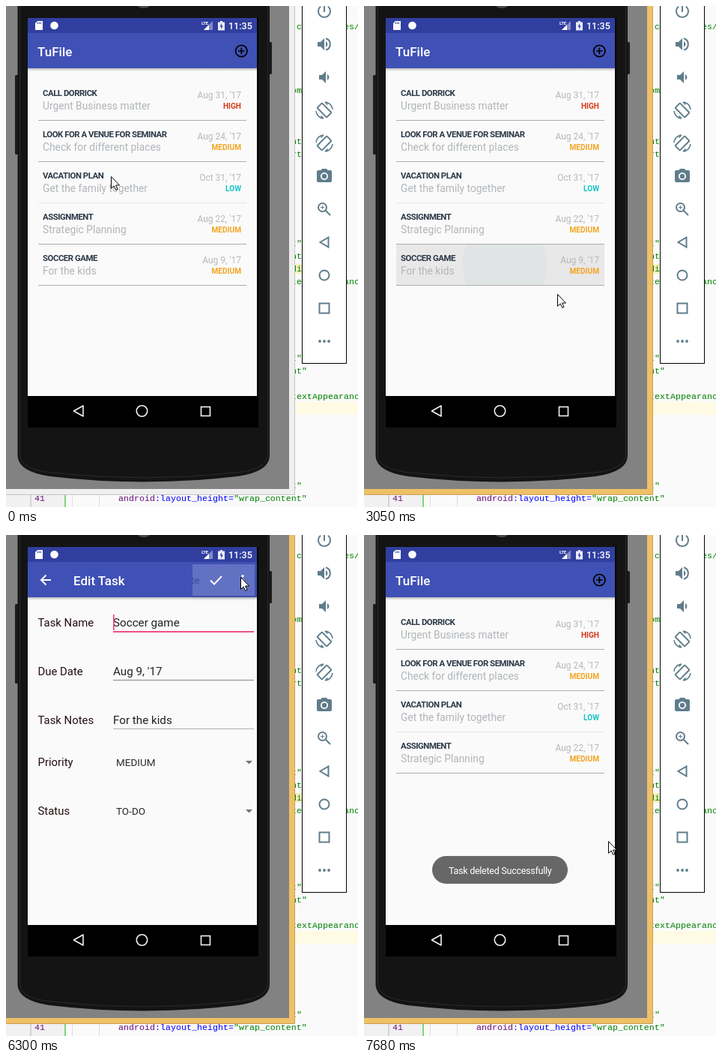
Recreate the animation shown at these times as an HTML page. Size 470x668 px, loop 8000 ms.

```html
<!DOCTYPE html>
<html lang="en">
<head>
<meta charset="utf-8">
<title>Task list demo</title>
<style>
  html, body { margin: 0; width: 100%; height: 100%; overflow: hidden; background: #fafafa; }
  svg { display: block; width: 470px; height: 668px; font-family: Roboto, sans-serif; }
  text { white-space: pre; }
  .code { font: 11.67px "Liberation Mono", monospace; fill: #008000; }
  .attr { fill: #660e7a; }
  .name { fill: #0000ff; }
  .bar { font-size: 17px; font-weight: 500; fill: #fff; }
  .title { font-size: 11.4px; font-weight: 700; letter-spacing: -.48px; fill: #2c3947; }
  .note { font-size: 13.8px; fill: #b1b5b9; }
  .date { font-size: 12px; fill: #b5b8bc; text-anchor: end; }
  .level { font-size: 10.1px; font-weight: 700; text-anchor: end; }
  .label { font-size: 14.9px; fill: #260d10; }
  .field { font-size: 15.2px; fill: #212121; }
  .option { font-size: 13.5px; fill: #2b2b2b; }
  .toast { font-size: 12.6px; letter-spacing: -.3px; fill: #fff; }
  .line { fill: none; stroke-width: 2; }
</style>
</head>
<body>
<svg viewBox="0 0 470 668">
  <defs>
    <clipPath id="screenClip"><rect x="29" y="16" width="306" height="504"/></clipPath>
    <clipPath id="rowClip"><rect x="43" y="318" width="278" height="54"/></clipPath>
    <clipPath id="menuClip"><rect id="menuWindow" y="36" width="179" height="63"/></clipPath>
    <linearGradient id="shade" x2="0" y2="1">
      <stop offset="0" stop-opacity=".25"/><stop offset="1" stop-opacity="0"/>
    </linearGradient>
    <filter id="drop" x="-10%" y="-20%" width="120%" height="180%">
      <feDropShadow dx="0" dy="3" stdDeviation="3" flood-opacity=".35"/>
    </filter>
  </defs>

  <rect width="470" height="668" fill="#fafafa"/>
  <g id="editor"></g>

  <rect id="frame" width="386" height="651"/>
  <path id="frameEdge" d="M385.5 0V651.5H0" fill="none"/>
  <rect width="378" height="644" fill="#828282"/>
  <g fill="#1c1c1c">
    <rect x="12" y="92" width="5" height="106" rx="1.5"/>
    <rect x="351" y="48" width="4" height="43" rx="1.5"/>
    <path d="M15.5 0V600Q17 621 58 627Q184 642 310 627Q351 621 352 600V0Z" fill="#141414"/>
  </g>
  <path d="M18.5 0V600Q21 618 60 622Q184 636 308 622Q346 618 349.500 600V0" fill="none" stroke="#2b2b2b"/>
  <ellipse cx="184" cy="-1" rx="8" ry="4" fill="#4a4a4a"/>
  <rect x="29" y="16" width="308" height="546" fill="#000"/>
  <g fill="none" stroke="#f2f2f2" stroke-width="1.600">
    <path d="M103 533V547L90.500 540Z" stroke-linejoin="round"/>
    <circle cx="181.500" cy="540" r="7.200"/><rect x="260.500" y="534.500" width="12" height="12"/>
  </g>

  <g clip-path="url(#screenClip)">
    <g id="list">
      <rect x="29" y="16" width="306" height="504" fill="#fafafa"/>
      <rect x="29" y="36" width="306" height="47" fill="#3f51b5"/>
      <rect x="29" y="83" width="306" height="4" fill="url(#shade)"/>
      <text class="bar" x="42" y="67">TuFile</text>
      <g fill="none" stroke="#000" stroke-width="1.700">
        <circle cx="314.300" cy="60" r="7.700"/><path d="M310 60H318.600M314.300 55.700V64.300"/>
      </g>
      <g id="press" clip-path="url(#rowClip)">
        <rect x="43" y="318" width="278" height="54" fill="#e8e8e8"/>
        <circle id="ripple" cx="188" cy="345" fill="#e1e4e4"/>
      </g>
      <g id="rows"></g>
    </g>
    <g id="edit">
      <rect x="29" y="36" width="306" height="530" fill="#fafafa"/>
      <rect x="29" y="36" width="306" height="47" fill="#3f51b5"/>
      <rect x="29" y="83" width="306" height="4" fill="url(#shade)"/>
      <text class="bar" x="90" y="67">Edit Task</text>
      <path class="line" d="M60 60H47.500M53.500 53.500L47 60L53.500 66.500" stroke="#fff"/>
      <path class="line" d="M273 60.500L278 65.500L288 55" stroke="#fff"/>
      <path d="M316 54.800V66" stroke="#fff" stroke-width="3.600" stroke-linecap="round" stroke-dasharray="0 5.200"/>
      <g id="fields"></g>
      <rect id="caret" x="143" y="106" width="1.600" height="21" fill="#f0407c"/>
    </g>
    <rect x="29" y="16" width="306" height="20" fill="#303f9f"/>
    <g fill="#fff">
      <path d="M42 20H49V32H39V23Z"/>
      <path d="M42.500 21.500V24M44.500 21.500V24M46.500 21.500V24" stroke="#303f9f"/>
      <circle cx="64.500" cy="26" r="5.300"/>
      <text x="261" y="25" font-size="6" font-weight="700" letter-spacing="-.3">LTE</text>
      <path d="M276 20V32H264Z" opacity=".4"/><path d="M271 25V32H264Z"/>
      <path d="M286 20H289V21.500H292V32.500H283V21.500H286Z" opacity=".9"/>
      <path d="M288 23L285.500 27.500H287.300V31L289.800 26.500H288Z" fill="#303f9f"/>
      <text x="297" y="30.500" font-size="12.500" font-weight="500">11:35</text>
    </g>
    <g id="menu" clip-path="url(#menuClip)">
      <rect x="164" y="39" width="168" height="42" fill="#fafafa" filter="url(#drop)"/>
      <text id="menuText" class="option" y="65">Delete</text>
    </g>
    <g id="toast">
      <rect x="91" y="428" width="181" height="37" rx="18.500" fill="#676767"/>
      <text class="toast" x="113" y="451.500">Task deleted Successfully</text>
    </g>
  </g>

  <rect x="395.500" y="-5" width="59" height="481.500" fill="#fff" stroke="#000"/>
  <g id="tools" fill="#607d8b" stroke="#607d8b" stroke-width="0"></g>

  <path id="pointer" d="M.5 .5V16.300L4.200 12.900L6.700 18.400L9 17.400L6.600 12H11.500Z" fill="#fff" stroke="#000"/>
</svg>

<script>
const LOOP = 8000, TICK = 120;
const $ = id => document.getElementById(id);
const text = (cls, x, y, s, extra = "") => `<text class="${cls}" x="${x}" y="${y}" ${extra}>${s}</text>`;

// Visible ends of the code lines behind the emulator, by line
const codeEnds = {
  0: "c        es/", 5: "om", 9: "nt", 10: "rt", 17: 't"', 18: 'nt"', 19: "di", 20: "textAppearance",
  26: 't"', 27: 'nt"', 29: "textAppearance", 36: 't"',
};
$("editor").innerHTML =
  `<rect x="386" y="344" width="10" height="13" fill="#f6f1bd"/>
   <rect x="386" y="528" width="84" height="17" fill="#fffae3"/>
   <rect y="651" width="78" height="17" fill="#f1f1f1"/>
   <path d="M33 651V668" stroke="#b5b5b5"/>
   <path d="M79 651V668" stroke="#7fd67f" stroke-width="2"/>
   <path d="M88.500 651V668M124.500 651V668" stroke="#ddd"/>` +
  Object.entries(codeEnds).map(([n, s]) => text("code", n > 0 ? 381 : 388, 31 + 17 * n, s)).join("") +
  text("code attr", 38, 660, "41") +
  text("code", 150, 660, '<tspan class="attr">android</tspan><tspan class="name">:layout_height=</tspan>"wrap_content"');

const levelColor = { HIGH: "#d8391b", MEDIUM: "#f3a522", LOW: "#16c4c6" };
const tasks = [
  ["CALL DORRICK", "Urgent Business matter", "Aug 31, '17", "HIGH"],
  ["LOOK FOR A VENUE FOR SEMINAR", "Check for different places", "Aug 24, '17", "MEDIUM"],
  ["VACATION PLAN", "Get the family together", "Oct 31, '17", "LOW"],
  ["ASSIGNMENT", "Strategic Planning", "Aug 22, '17", "MEDIUM"],
  ["SOCCER GAME", "For the kids", "Aug 9, '17", "MEDIUM"],
];
$("rows").innerHTML = tasks.map(([title, note, date, level], i) => {
  const y = 55 * i;
  return `<g>${text("title", 49, y + 120, title)}${text("note", 49, y + 138, note)}
    ${text("date", 314, y + 122.5, date)}
    ${text("level", 314, y + 137, level, `fill="${levelColor[level]}"`)}
    <rect x="43" y="${y + 152}" width="278" height="1" fill="${i === 2 ? "#e6e6e6" : "#adadad"}"/></g>`;
}).join("");
const lastRow = $("rows").lastElementChild;

const underline = (y, color, height = 1) => `<rect x="143" y="${y + 6}" width="188" height="${height}" fill="${color}"/>`;
const dropArrow = y => `<path d="M320 ${y - 7}H329L324.500 ${y - 2.5}Z" fill="#757575"/>`;
const field = (y, label, value, line) => text("label", 42.5, y, label) + text("field", 143, y, value) + line;
const spinner = (y, label, value) => text("label", 42.5, y, label) + text("option", 147, y, value) + dropArrow(y);
$("fields").innerHTML =
  field(122, "Task Name", "Soccer game", underline(122, "#f0508a", 2)) +
  field(187, "Due Date", "Aug 9, '17", underline(187, "#858585")) +
  field(252, "Task Notes", "For the kids", underline(252, "#adadad")) +
  spinner(308, "Priority", "MEDIUM") +
  spinner(373, "Status", "TO-DO");

// Emulator toolbar: 24 px icons, 44 px apart
const line = (d, width = 2) => `<path class="line" style="stroke-width:${width}" d="${d}"/>`;
const speaker = `<path d="M3 9V15H7L12 20V4L7 9Z"/><path d="M14 8A4.500 4.500 0 0 1 14 16Z"/>`;
const turn = `<rect class="line" x="7.500" y="3" width="9" height="18" rx="1" transform="rotate(-45 12 12)"/>` +
  line("M13 1A11 11 0 0 1 23 11M13 1L16.500 4.500M11 23A11 11 0 0 1 1 13M11 23L7.500 19.500", 1.6);
const icons = [
  line("M12 3V13M7 5.800A8 8 0 1 0 17 5.800"),
  speaker + line("M14 4.300A8 8 0 0 1 14 19.700"),
  `<g transform="translate(2 0)">${speaker}</g>`,
  turn,
  `<g transform="matrix(-1 0 0 1 24 0)">${turn}</g>`,
  `<path fill-rule="evenodd" d="M9 2L7.200 4H4a2 2 0 0 0-2 2V18a2 2 0 0 0 2 2H20a2 2 0 0 0 2-2V6a2 2 0 0 0-2-2H16.800L15 2ZM12 7a5 5 0 1 0 .01 0Z"/><circle cx="12" cy="12" r="3.200"/>`,
  line("M15 9.500A5.500 5.500 0 1 0 4 9.500A5.500 5.500 0 1 0 15 9.500M14 14L20 20") + line("M7 9.500H12M9.500 7V12", 1),
  line("M17.500 5.500V18.500L6.500 12Z"),
  `<circle class="line" cx="12" cy="12" r="6.500"/>`,
  `<rect class="line" x="5.500" y="5.500" width="13" height="13"/>`,
  [6, 12, 18].map(x => `<circle cx="${x}" cy="12" r="1.900"/>`).join(""),
];
$("tools").innerHTML = icons.map((icon, i) => `<g transform="translate(413 ${44 * i - 5})">${icon}</g>`).join("");

// Turning points of the pointer: tick, x, y
const route = [
  [0, 140, 227], [3, 124, 393], [6, 192, 463], [8, 202, 158], [10, 141, 114], [11, 142, 297],
  [13, 170, 360], [16, 192, 335], [22, 191, 335], [25, 258, 384], [30, 249, 393], [33, 223, 221],
  [35, 190, 248], [37, 194, 303], [40, 200, 297], [42, 204, 356], [44, 235, 124], [45, 285, 52],
  [48, 311, 54], [53, 313, 56], [60, 182, 58], [62, 326, 396], [64, 326, 408], [67, 326, 408],
];

const ramp = (t, from, to) => Math.min(1, Math.max(0, (t - from) / (to - from)));

function pointerAt(tick) {
  const next = route.findIndex(([at]) => at > tick);
  const [t0, x0, y0] = route[next - 1], [t1, x1, y1] = route[next];
  const k = ramp(tick, t0, t1);
  return [x0 + (x1 - x0) * k, y0 + (y1 - y0) * k].map(Math.round);
}

const set = (id, attrs) => Object.entries(attrs).forEach(([key, value]) => $(id).setAttribute(key, value));

function draw(now) {
  const tick = Math.floor(now / TICK), t = tick * TICK;
  const focused = now >= 2660;
  set("frame", { fill: focused ? "#efc067" : "#efefef" });
  set("frameEdge", { stroke: focused ? "#c9a052" : "#c4c4c4" });

  set("press", { opacity: +(focused && now < 3600) });
  set("ripple", { r: 14 + 43 * Math.max(0, t - 2640) / 360 });
  lastRow.setAttribute("opacity", +(now < 7440));

  const edit = ramp(t, 3120, 3480) - ramp(t, 7440, 7680);
  set("edit", { opacity: edit, transform: `translate(0 ${40 * (1 - edit) ** 2})` });
  const blinkOff = now > 3590 && now < 6200 && (now - 3590) % 980 < 470;
  set("caret", { opacity: +!blinkOff });

  const reveal = ramp(t, 6060, 6420), hidden = 170 * (1 - reveal);
  set("menu", { opacity: reveal ** 2.4 * (1 - ramp(t, 7320, 7470)) });
  set("menuWindow", { x: reveal < 1 ? 164 + hidden : 156 });
  set("menuText", { x: 178 + hidden / 2 });

  set("toast", { opacity: ramp(t, 7320, 7530) });
  set("pointer", { transform: `translate(${pointerAt(tick)})` });
}

function loop() {
  draw(performance.now() % LOOP);
  requestAnimationFrame(loop);
}
loop();
</script>
</body>
</html>
```
